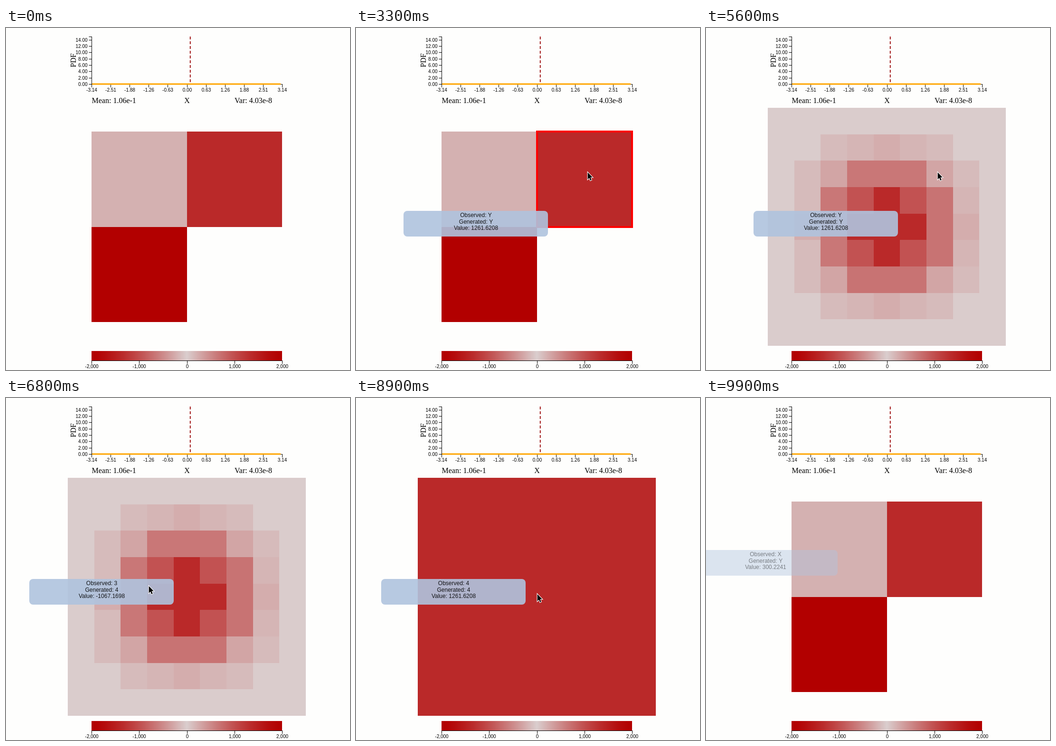
These frames come from a looping animation (724x720 px, 10000 ms). An HTML page with a canvas:

```html
<!DOCTYPE html>
<html lang="en">
<head>
<meta charset="utf-8">
<title>Matrix zoom</title>
<style>
html, body { margin: 0; width: 100%; height: 100%; overflow: hidden; background: #fefefd; }
canvas { display: block; }
</style>
</head>
<body>
<canvas id="stage" width="724" height="720"></canvas>
<script>
const ctx = document.getElementById('stage').getContext('2d');
const LOOP = 10000, STEP = 50;
const SANS = '"Liberation Sans", Arial, sans-serif';
const SERIF = '"Liberation Serif", Times, serif';

// Column edges (left, split, right) and row edges (top, middle, bottom)
const BASE = [180, 381, 581, 218, 419, 619];
const FOCUS = [130, 232.5, 582, 218, 567.5, 669];
const FULL = [130, 130, 631, 168, 669, 669];
const ZOOM = [
  [3900, BASE], [4700, FOCUS], [4950, FOCUS], [5400, FULL],
  [8950, FULL], [9250, FOCUS], [9550, BASE], [LOOP, BASE]
];

// Pointer: time, x, y
const PATH = [
  [300, -20, 360], [900, 250, 340], [1300, 285, 330], [1900, 290, 500],
  [2400, 300, 510], [2850, 370, 440], [2900, 401, 413], [3200, 487, 303],
  [5700, 487, 303], [6200, 480, 400], [6500, 405, 410], [6650, 364, 409],
  [6700, 350, 409], [6800, 300, 395], [6900, 270, 400], [7100, 275, 470],
  [7250, 385, 525], [7420, 485, 460], [7500, 480, 365], [7550, 456, 325],
  [7600, 447, 308], [7800, 380, 300], [8000, 275, 330], [8250, 265, 400],
  [8500, 340, 408], [8550, 354, 409], [8750, 381, 412], [9650, 381, 412],
  [9700, 274, 348], [9750, -20, 330]
];

const GRID = [
  '.........',
  '..pPtPp..',
  '.pToooTp.'.replace(' ', ''),
  '.poqDqsP.',
  '.toDDDst.',
  '.poqDqsP.',
  '.pTsssTp.',
  '..pPtPp..',
  '.........'
];
// Depth of red and value of each kind of cell
const KINDS = {
  '.': [.01, '0.0000'],
  p: [.09, '112.4163'],
  P: [.12, '148.0927'],
  t: [.16, '-232.4070'],
  T: [.2, '-301.5540'],
  o: [.42, '-555.7285'],
  s: [.44, '-584.9016'],
  q: [.6, '-826.6391'],
  D: [.8, '-1067.1698']
};
const CELL = 501 / 9;

const lerp = (a, b, p) => a + (b - a) * p;
const clamp = v => Math.max(0, Math.min(1, v));
const ease = p => p < .5 ? 4 * p ** 3 : 1 - (2 - 2 * p) ** 3 / 2;
const ramp = (t, a, b) => clamp((t - a) / (b - a));
const shade = p => {
  const gb = lerp(206, 0, p);
  return `rgb(${lerp(218, 178, p)},${gb},${gb})`;
};

function layout(t) {
  if (t <= ZOOM[0][0]) return BASE;
  const i = ZOOM.findIndex(k => k[0] >= t);
  const [t0, a] = ZOOM[i - 1], [t1, b] = ZOOM[i];
  const p = ease(ramp(t, t0, t1));
  return a.map((v, n) => lerp(v, b[n], p));
}

function pointer(t) {
  const i = PATH.findIndex(k => k[0] >= t);
  if (i < 1) return [-40, 330];
  const a = PATH[i - 1], b = PATH[i], p = ramp(t, a[0], b[0]);
  return [lerp(a[1], b[1], p), lerp(a[2], b[2], p)];
}

// Cell under the pointer as [observed, generated, value]
function hover(t) {
  const [x, y] = pointer(t);
  const YY = ['Y', 'Y', '1261.6208'];
  if ((t >= 3200 && t < 5700) || (t >= 9000 && t < 9700)) return YY;
  if (t >= 5700 && t < 9000) {
    const c = Math.floor((x - 130) / CELL), r = Math.floor((y - 168) / CELL);
    return [c, r, c === 4 && r === 4 ? YY[2] : KINDS[GRID[r][c]][1]];
  }
  if (x < 180 || x > 581 || y < 218 || y > 619) return null;
  if (x < 381) return y < 419 ? ['X', 'Y', '300.2241'] : ['X', 'X', '-1936.7052'];
  return y < 419 ? YY : null;
}

// Each change of hovered cell fixes the tooltip at the entry point
const visits = [];
for (let t = 0, last = ''; t < LOOP; t += STEP) {
  const cell = hover(t), key = String(cell);
  if (key !== last && (cell || visits.length)) {
    const [x, y] = pointer(t);
    visits.push({ t, cell, x: x - 301, y: y - 28 });
  }
  last = key;
}

function text(s, x, y, font, align = 'center') {
  ctx.font = font;
  ctx.textAlign = align;
  ctx.fillStyle = '#000';
  ctx.fillText(s, x, y);
}

function line(x0, y0, x1, y1, color = '#000', width = 1) {
  ctx.strokeStyle = color;
  ctx.lineWidth = width;
  ctx.beginPath();
  ctx.moveTo(x0, y0);
  ctx.lineTo(x1, y1);
  ctx.stroke();
}

function box(x0, y0, x1, y1, color) {
  ctx.fillStyle = color;
  ctx.fillRect(x0, y0, x1 - x0, y1 - y0);
}

function chart() {
  const small = '10px ' + SANS, big = '16px ' + SERIF;
  line(180.5, 18, 180.5, 119);
  line(174.5, 18.5, 181, 18.5);
  for (let v = 0; v < 15; v += 2) {
    const y = Math.round(118 - v * 100 / 15) + .5;
    line(174.5, y, 181, y);
    text(v.toFixed(2), 171.5, y + 3.5, small, 'right');
  }
  line(180, 118.5, 582, 118.5);
  for (let i = 0; i <= 10; i++) {
    const x = Math.round(180 + i * 40.1) + .5;
    line(x, 118, x, 125);
    text(((i - 5) * Math.PI / 5).toFixed(2), x, 134, small);
  }
  ctx.setLineDash([6, 4]);
  line(387.8, 18, 387.8, 118, '#a01414', 2);
  ctx.setLineDash([]);
  line(181, 118, 578, 118, '#ffa500', 3);
  text('Mean: 1.06e-1', 180.5, 158, big, 'left');
  text('X', 381, 158, big);
  text('Var: 4.03e-8', 481, 158, big, 'left');
  ctx.save();
  ctx.translate(147, 68);
  ctx.rotate(-Math.PI / 2);
  text('PDF', 0, 0, big);
  ctx.restore();
}

function legend() {
  const g = ctx.createLinearGradient(180, 0, 581, 0);
  for (let i = 0; i <= 40; i++) {
    const x = Math.abs(i / 20 - 1);
    g.addColorStop(i / 40, shade(1 - (1 - x) ** 1.4));
  }
  box(180, 680, 581, 700, g);
  line(180, 700.5, 582, 700.5);
  for (let i = 0; i < 5; i++) {
    const x = Math.round(180 + i * 100.25) + .5;
    line(x, 700, x, 707);
    text(((i - 2) * 1000).toLocaleString('en-US'), x, 716, '10px ' + SANS);
  }
}

function matrix(t) {
  const [l, s, r, top, m, b] = layout(t);
  box(l, top, s, m, shade(.14));
  box(l, m, s, b, shade(1));
  box(s, top, r, m, shade(.8));
  const k = hover(t);
  const lit = k && k[0] === 'Y' && (t < 5050 || t > 8950);
  if (lit) {
    ctx.strokeStyle = '#f00';
    ctx.lineWidth = 4 * (r - s) / 200;
    ctx.strokeRect(s, top, r - s, m - top);
  }
  const alpha = ramp(t, 5300, 5550) * (1 - ramp(t, 8700, 8880));
  if (!alpha) return;
  ctx.globalAlpha = alpha;
  const edge = n => Math.round(n * CELL);
  GRID.forEach((row, j) => [...row].forEach((c, i) =>
    box(130 + edge(i), 168 + edge(j), 130 + edge(i + 1), 168 + edge(j + 1), shade(KINDS[c][0]))));
  ctx.globalAlpha = 1;
}

function tooltip(t) {
  const i = visits.findLastIndex(v => v.t <= t);
  if (i < 0) return;
  let v = visits[i], alpha = 1;
  if (!v.cell) {
    alpha = 1 - ramp(t, v.t, v.t + 300);
    v = visits[i - 1];
  } else if (!i || !visits[i - 1].cell) {
    alpha = ramp(t, v.t, v.t + 200);
  }
  if (!alpha) return;
  ctx.globalAlpha = alpha * .9;
  ctx.fillStyle = 'lightsteelblue';
  ctx.beginPath();
  ctx.roundRect(v.x, v.y, 304, 54, 8);
  ctx.fill();
  const [obs, gen, val] = v.cell;
  ['Observed: ' + obs, 'Generated: ' + gen, 'Value: ' + val].forEach((s, n) =>
    text(s, v.x + 152.5, v.y + 13 + n * 13.5, '12px ' + SANS));
  ctx.globalAlpha = 1;
}

function arrow(t) {
  const [x, y] = pointer(t);
  ctx.save();
  ctx.translate(x, y);
  ctx.scale(.9, .95);
  ctx.beginPath();
  ctx.moveTo(.8, 1);
  [[.8, 16.5], [4.5, 13.2], [7, 19], [9.6, 17.9], [7.2, 12.2], [12, 12]]
    .forEach(p => ctx.lineTo(...p));
  ctx.closePath();
  ctx.lineWidth = 2.4;
  ctx.strokeStyle = '#fff';
  ctx.stroke();
  ctx.fillStyle = '#000';
  ctx.fill();
  ctx.restore();
}

function draw(t) {
  box(0, 0, 724, 720, '#fefefd');
  chart();
  legend();
  matrix(t);
  tooltip(t);
  arrow(t);
}

const start = performance.now();
function frame() {
  const t = (performance.now() - start) % LOOP;
  draw(Math.floor(t / 100) * 100);
  requestAnimationFrame(frame);
}
frame();
</script>
</body>
</html>
```
